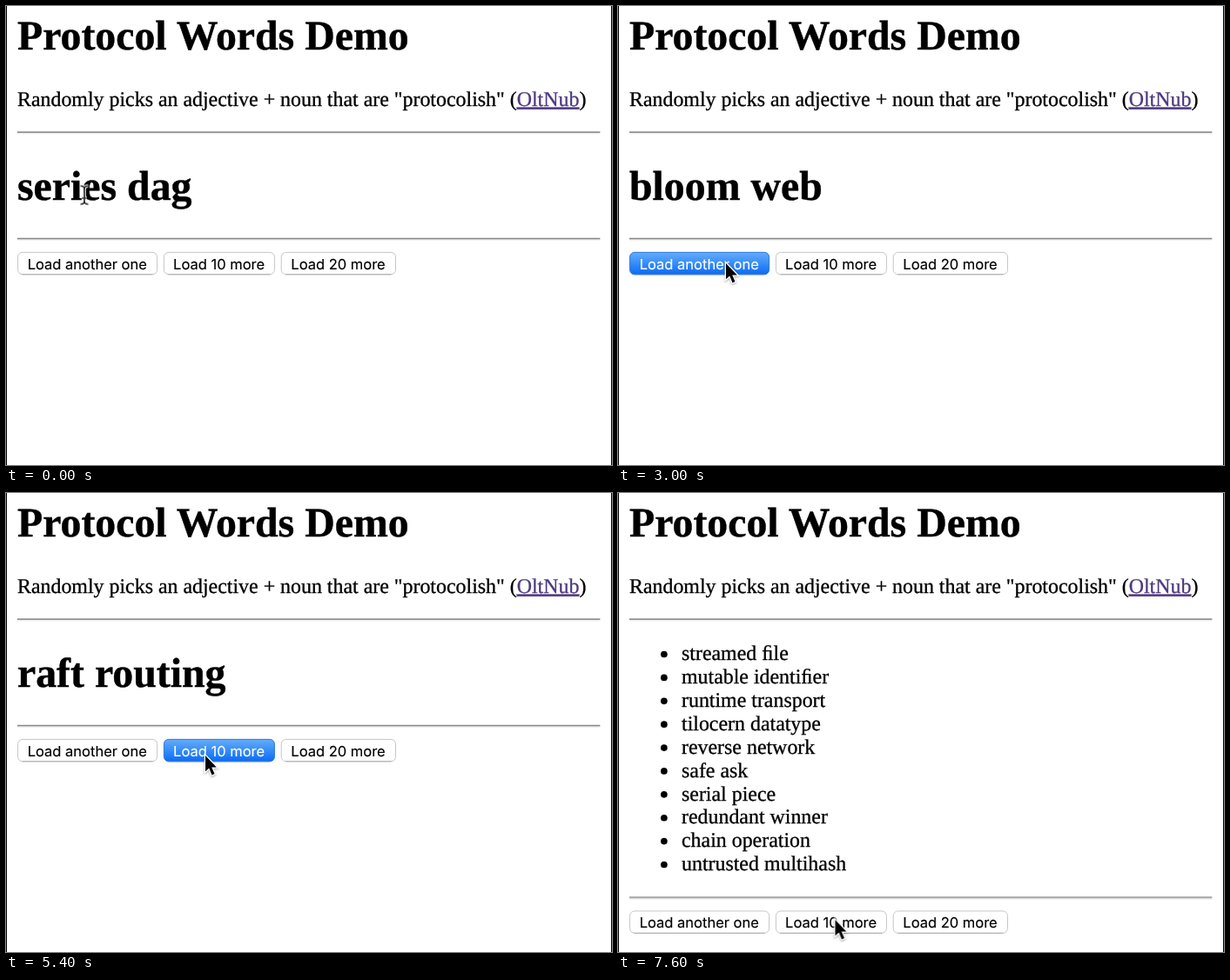
These frames come from a looping animation (696 by 528 pixels, 8 s). An HTML page:

```html
<!DOCTYPE html>
<html lang="en">
<head>
<meta charset="utf-8">
<title>Protocol Words Demo</title>
<style>
  html, body { margin: 0; width: 100%; height: 100%; overflow: hidden; background: #fff; }
  svg { display: block; width: 696px; height: 528px; }
  text {
    font-family: "Liberation Serif", "Times New Roman", Times, serif;
    font-size: 23.9px;
    text-rendering: geometricPrecision;
    stroke: #000;
    stroke-width: .3px;
  }
  .big { font-size: 47.8px; font-weight: bold; stroke-width: .45px; }
  .link { fill: #4f3a80; stroke: #4f3a80; text-decoration: underline; }
  .btn rect { fill: #fff; stroke: #c6c6c6; }
  .btn .edge { fill: none; stroke: #adadad; }
  .btn .down rect { fill: url(#blue); stroke: #2f7be0; }
  .btn text { font: 16.5px Inter, Roboto, sans-serif; text-anchor: middle; stroke-width: .15px; }
  .btn .down text { fill: #fff; stroke: #fff; }

  .anim { animation: 8s step-end infinite; }
  .hide { opacity: 0; }
  #p0 { animation-name: p0; }
  #p1 { animation-name: p1; }
  #p2 { animation-name: p2; }
  #p3 { animation-name: p3; }
  #p4 { animation-name: p4; }
  #listA { animation-name: listA; }
  #listB { animation-name: listB; }
  #footer { animation-name: footer; }
  #downOne { animation-name: downOne; }
  #downTen { animation-name: downTen; }
  #cursor { animation-name: path; }
  #arrow { animation-name: arrow; filter: drop-shadow(0 1px 1px rgba(0, 0, 0, .35)); }
  #beam { animation-name: beam; }

  @keyframes p0 { 0% { opacity: 1 } 10%, 100% { opacity: 0 } }
  @keyframes p1 { 0% { opacity: 0 } 10% { opacity: 1 } 25%, 100% { opacity: 0 } }
  @keyframes p2 { 0% { opacity: 0 } 25% { opacity: 1 } 40%, 100% { opacity: 0 } }
  @keyframes p3 { 0% { opacity: 0 } 40% { opacity: 1 } 55%, 100% { opacity: 0 } }
  @keyframes p4 { 0% { opacity: 0 } 55% { opacity: 1 } 70%, 100% { opacity: 0 } }
  @keyframes listA { 0% { opacity: 0 } 70% { opacity: 1 } 92.5%, 100% { opacity: 0 } }
  @keyframes listB { 0% { opacity: 0 } 92.5%, 100% { opacity: 1 } }
  @keyframes footer { 0% { transform: none } 70%, 100% { transform: translateY(197.5px) } }
  @keyframes downOne {
    0%, 12.5%, 27.5%, 42.5%, 100% { opacity: 0 }
    7.5%, 22.5%, 37.5% { opacity: 1 }
  }
  @keyframes downTen {
    0%, 70%, 95%, 100% { opacity: 0 }
    67.5%, 90% { opacity: 1 }
  }
  @keyframes path {
    0% { transform: translate(90px, 217.5px) }
    2.5% { transform: translate(97px, 262px) }
    5% { transform: translate(103px, 317px) }
    7.5% { transform: translate(104.5px, 291px) }
    20% { transform: translate(116px, 297px) }
    22.5% { transform: translate(124px, 296px) }
    60% { transform: translate(172px, 299px) }
    62.5% { transform: translate(216px, 302px) }
    65% { transform: translate(229px, 302px) }
    75% { transform: translate(222px, 296px) }
    77.5% { transform: translate(205px, 332px) }
    80% { transform: translate(193px, 390px) }
    82.5% { transform: translate(206px, 454px) }
    85% { transform: translate(252px, 493px) }
    87.5%, 100% { transform: translate(249.5px, 491px) }
  }
  @keyframes arrow { 0% { opacity: 0 } 2.5% { opacity: 1 } 72.5% { opacity: 0 } 82.5%, 100% { opacity: 1 } }
  @keyframes beam { 0% { opacity: 1 } 2.5% { opacity: 0 } 72.5% { opacity: 1 } 82.5%, 100% { opacity: 0 } }
</style>
</head>
<body>
<svg viewBox="0 0 696 528">
  <defs>
    <linearGradient id="blue" x2="0" y2="1">
      <stop stop-color="#64adfb"/><stop offset="1" stop-color="#0a6bf5"/>
    </linearGradient>
    <g id="rule">
      <rect x="13" width="669.3" height="3" fill="#eee"/>
      <rect x="13" width="669.3" height="1.5" fill="#868686"/>
    </g>
    <path id="ibeam" fill="none" d="M-4.5-10.5Q0-10.5 0-7V7Q0 10.5-4.5 10.5M4.5-10.5Q0-10.5 0-7M4.5 10.5Q0 10.5 0 7M-3 3.5H3"/>
  </defs>

  <rect width="696" height="528" fill="#fff"/>
  <text class="big" x="13" y="49.7">Protocol Words Demo</text>
  <text x="13" y="114.5">Randomly picks an adjective + noun that are "protocolish" (<tspan class="link">OltNub</tspan>)</text>
  <use href="#rule" y="144.4"/>

  <text class="big anim" id="p0" x="13" y="222.9">series dag</text>
  <text class="big anim hide" id="p1" x="13" y="222.9">itemized ask</text>
  <text class="big anim hide" id="p2" x="13" y="222.9">bloom web</text>
  <text class="big anim hide" id="p3" x="13" y="222.9">streamable dataset</text>
  <text class="big anim hide" id="p4" x="13" y="222.9">raft routing</text>
  <g id="listA" class="anim hide"></g>
  <g id="listB" class="anim hide"></g>

  <g id="footer" class="anim">
    <use href="#rule" y="266.8"/>
    <g id="buttons"></g>
  </g>

  <path d="M.5 0V528M695.5 0V528" stroke="#000"/>

  <g id="cursor" class="anim">
    <path id="arrow" class="anim hide" d="M0 0V18.3L4.2 14.5 7.5 22.4 10.5 21.1 7.2 13.4H12.8Z"
      fill="#000" stroke="#fff" stroke-width="2.6" paint-order="stroke"/>
    <g id="beam" class="anim">
      <use href="#ibeam" stroke="#fff" stroke-width="3.6"/>
      <use href="#ibeam" stroke="#222" stroke-width="1.6"/>
    </g>
  </g>
</svg>
<script>
  const lists = {
    listA: ["merkle backup", "shared validated", "compressed cbor", "local capability", "assembled media",
      "linked library", "merkle identifier", "derived dispute", "vector transaction", "deterministic exception"],
    listB: ["streamed file", "mutable identifier", "runtime transport", "tilocern datatype", "reverse network",
      "safe ask", "serial piece", "redundant winner", "chain operation", "untrusted multihash"]
  };
  const $ = id => document.getElementById(id);

  for (const id in lists) {
    $(id).innerHTML = lists[id].map((label, i) => {
      const y = 192.2 + i * 26.89;
      const text = label.replace("fi", "\ufb01"); // joined letters
      return `<circle cx="52.9" cy="${y - 6.7}" r="3.85"/><text x="73" y="${y}">${text}</text>`;
    }).join("");
  }

  function button(label, x, w, downId) {
    const box = `<rect x="${x}" y="283.4" width="${w}" height="25.4" rx="5.5"/>`;
    const text = `<text x="${x + w / 2 - .3}" y="302.7">${label}</text>`;
    const edge = `<path class="edge" d="M${x + 5} 308.8h${w - 10}"/>`;
    const down = downId ? `<g id="${downId}" class="down anim hide">${box}${text}</g>` : "";
    return `<g class="btn">${box}${edge}${text}${down}</g>`;
  }

  $("buttons").innerHTML =
    button("Load another one", 13.6, 160, "downOne") +
    button("Load 10 more", 181.4, 127, "downTen") +
    button("Load 20 more", 316.2, 131.3);
</script>
</body>
</html>
```
